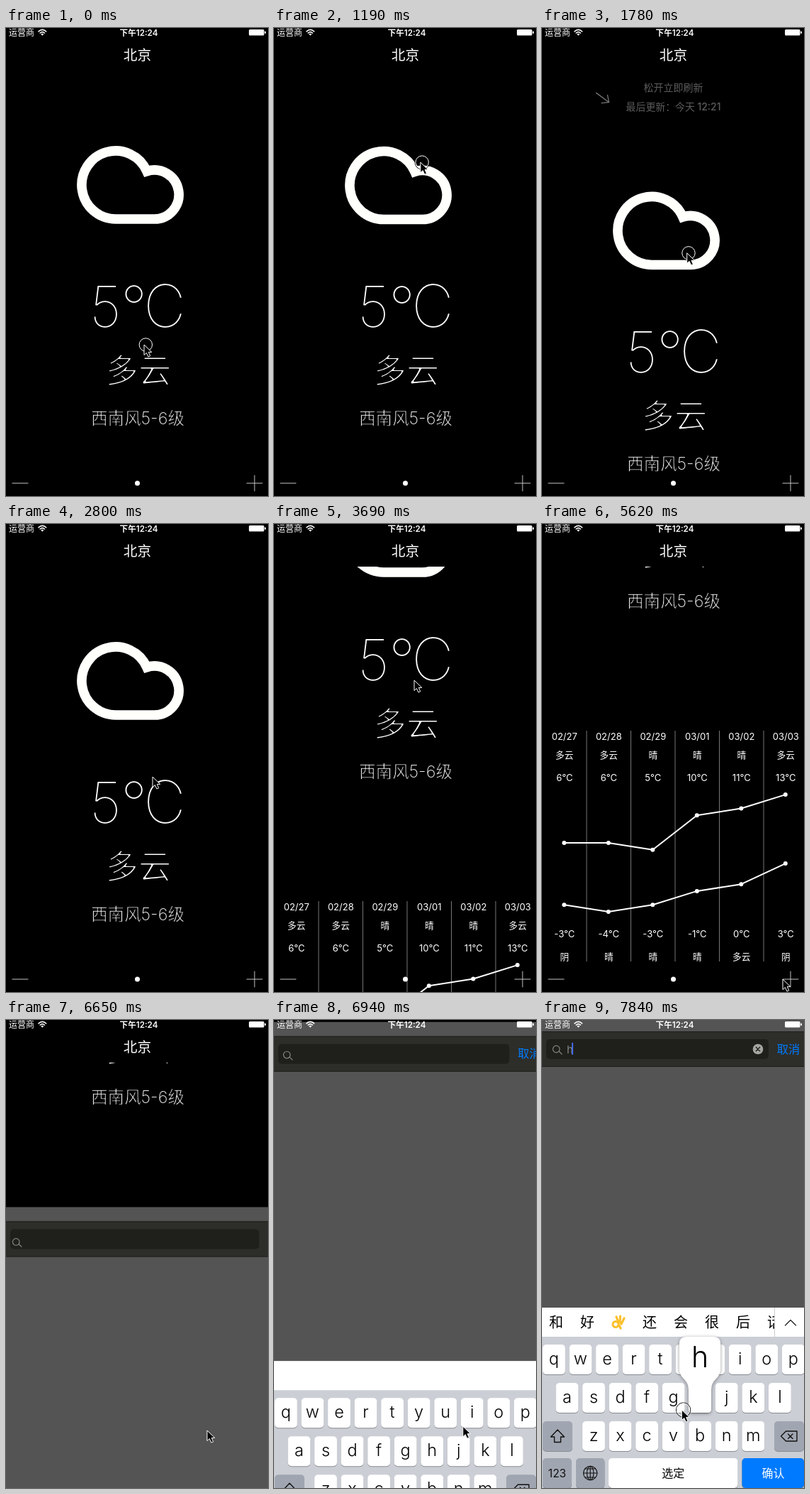
These frames come from a looping animation (370 px wide and 659 px high, 7990 ms). An HTML page:

```html
<!DOCTYPE html>
<html lang="zh-CN">
<head>
<meta charset="utf-8">
<title>天气</title>
<style>
html, body { margin: 0; width: 100%; height: 100%; overflow: hidden; background: #000; }
svg { display: block; width: 100vw; height: 100vh; }
text { font-family: Inter, "Noto Sans CJK SC", "Noto Sans CJK", sans-serif; white-space: pre; }
.line { fill: none; stroke-linecap: round; stroke-linejoin: round; }
/* A background-coloured outline turns regular strokes into hairlines. */
.hairline { stroke: #000; stroke-linejoin: round; }
</style>
</head>
<body>
<svg viewBox="0 0 370 659" preserveAspectRatio="none">
  <defs>
    <clipPath id="page"><rect y="60" width="370" height="599"/></clipPath>
    <clipPath id="words"><rect y="405" width="328" height="41"/></clipPath>
    <filter id="lift" x="-30%" y="-30%" width="160%" height="160%">
      <feDropShadow dx="0" dy="1" stdDeviation="2.5" flood-opacity=".4"/>
    </filter>
  </defs>
  <rect width="370" height="659"/>
  <g clip-path="url(#page)"><g id="scroll"></g></g>
  <g id="chrome"></g>
  <g id="sheet"></g>
  <g id="keyboard"></g>
  <g id="status"></g>
  <g id="pointer">
    <g id="ring" fill="none">
      <circle cx="2.3" r="10.1" stroke="#000"/>
      <circle cx="2.3" r="9.2" stroke="#fff"/>
    </g>
    <path d="M0 0V14.5L3.4 11.5L5.9 17L8.7 15.8L6.3 10.4H10.8Z" fill="#000" stroke="#fff"/>
  </g>
</svg>
<script>
const $ = id => document.getElementById(id);

const text = (x, y, size, str, { weight = 400, fill = '#fff', anchor = 'middle', extra = '' } = {}) =>
  `<text x="${x}" y="${y}" font-size="${size}" font-weight="${weight}" fill="${fill}" text-anchor="${anchor}" ${extra}>${str}</text>`;
const thin = (str, width) => `<tspan class="hairline" stroke-width="${width}">${str}</tspan>`;
const rect = (x, y, w, h, fill, r = 0, extra = '') =>
  `<rect x="${x}" y="${y}" width="${w}" height="${h}" rx="${r}" fill="${fill}" ${extra}/>`;
const line = (d, stroke, width = 1, extra = '') =>
  `<path class="line" d="${d}" stroke="${stroke}" stroke-width="${width}" ${extra}/>`;

// Weather page
function forecast() {
  const days = [
    ['02/27', '多云', 6, -3, '阴'], ['02/28', '多云', 6, -4, '晴'], ['02/29', '晴', 5, -3, '晴'],
    ['03/01', '晴', 10, -1, '晴'], ['03/02', '晴', 11, 0, '多云'], ['03/03', '多云', 13, 3, '阴']
  ];
  const colX = i => 31.3 + i * 62.5;
  const curve = temps => {
    const points = temps.map((t, i) => [colX(i), 948.2 - 9.7 * t]);
    return line('M' + points.join('L'), '#fff', 2)
      + points.map(([x, y]) => `<circle cx="${x}" cy="${y}" r="3" fill="#fff"/>`).join('');
  };
  const columns = days.map(([date, day, high, low, night], i) => {
    const x = colX(i) + .5;
    return text(x, 744.5, 13, date) + text(x, 771, 12.7, day) + text(x, 803, 13, high + '°C')
      + text(x, 1022.5, 13, low + '°C') + text(x, 1054.5, 12.7, night)
      + (i ? rect(i * 62.5, 732, 1, 325, '#777') : '');
  });
  return columns.join('') + curve(days.map(d => d[2])) + curve(days.map(d => d[3]));
}

const hintStyle = { weight: 500, fill: '#5c5c5c' };
$('scroll').innerHTML =
  text(185.5, 25, 14, '', { ...hintStyle, extra: 'id="hint"' })
  + text(185.5, 51.5, 13.9, '最后更新：今天 12:21', hintStyle)
  + `<g transform="translate(85.5 33.5)">${line('M-11 0H11M3.5-7L11.3 0L3.5 7', '#777', 1.3, 'id="arrow"')}</g>`
  + `<path d="M155 269A48 48 0 1 1 198.9 201.7A34.5 34.5 0 1 1 209.5 269Z"
      fill="none" stroke="#fffffc" stroke-width="13.6" stroke-miterlimit="10"/>`
  + text(140.8, 420.5, 79, '5', { weight: 100 })
  + text(180.5, 423, 82, '°', { weight: 100 })
  + text(224, 420.5, 82, 'C', { weight: 100 })
  + text(187, 498.5, 46.5, thin('多云', 2.1))
  + text(186, 557.5, 23.6, thin('西南风', .75) + '5-6' + thin('级', .75), { weight: 200, fill: '#f0f0f0' })
  + forecast();

$('chrome').innerHTML = text(185.5, 45, 19.7, '北京')
  + line('M9 641H31M340 641H362M351 630V652', '#c4c4c4')
  + '<circle cx="185.5" cy="641" r="3.5" fill="#fff"/>';

$('status').innerHTML = text(4, 10.7, 12, '运营商', { anchor: 'start' })
  + line('M46 4.8Q51.3 0 56.6 4.8M48.2 7Q51.3 4.2 54.4 7', '#fff', 1.6)
  + '<path d="M49.2 8.5Q51.3 6.8 53.4 8.5L51.3 10.8Z" fill="#fff"/>'
  + text(187.5, 10.5, 11.6, '下午12:24', { weight: 600 })
  + rect(343, 2, 21.5, 8.5, '#fff', 1.5) + rect(365.3, 4.5, 1.7, 3.5, '#fff', .8);

// Search sheet
$('sheet').innerHTML = rect(0, 0, 370, 670, '#545454')
  + rect(0, 20, 370, 50, '#2d2e29') + rect(0, 20, 370, 1, '#1c1d19') + rect(0, 69, 370, 1, '#1c1d19')
  + rect(6, 31, 314, 28, '#1f201b', 5, 'id="field"')
  + `<g id="lens">${line('M4.3 3.3L8 7M5 0A4.8 4.8 0 1 1-4.6 0A4.8 4.8 0 1 1 5 0', '#85867f', 1.2)}</g>`
  + text(348, 50.5, 16.3, '取消', { fill: '#007aff', extra: 'id="cancel"' })
  + `<g id="query">${text(35, 50.5, 15, 'h', { fill: '#85888a', anchor: 'start' })}
    <circle cx="305" cy="45" r="7.3" fill="#a5a6a2"/>
    ${line('M302.3 42.3L307.7 47.7M307.7 42.3L302.3 47.7', '#1f201b', 1.4)}
    ${rect(42, 36, 2, 17, '#4468e8')}</g>`;

// Keyboard
const grey = '#a0a6b1';
const key = (x, y, w, fill = '#fff') => rect(x, y + 1, w, 42, '#888b91', 5) + rect(x, y, w, 42, fill, 5);
const letterRow = (letters, x0, y) => [...letters].map((c, i) => {
  const x = x0 + i * 37.55;
  return key(x, y, 31.8) + text(x + 15.9, y + 28, 23.5, c, { weight: 300, fill: '#000' });
}).join('');

$('keyboard').innerHTML = rect(0, 405, 370, 260, '#cbced5') + rect(0, 405, 370, 41, '#fff')
  + `<g id="candidates"><g clip-path="url(#words)">
    ${[...'和好 还会很后话'].map((c, i) => text(20 + 44 * i, 433.2, 20, c, { fill: '#000' })).join('')}
    <circle cx="104" cy="428.5" r="4" fill="none" stroke="#fbc02d" stroke-width="3"/>
    ${line('M108 426L105 418M110 426L110.5 417M112 428L116 420M109 430L111 434', '#fbc02d', 3.2)}</g>
    ${rect(328, 405, 1, 41, '#ccc')}${line('M343.5 430L351 422.5L358.5 430', '#222', 1.3)}</g>`
  + letterRow('qwertyuiop', 1, 457) + letterRow('asdfghjkl', 19.6, 511) + letterRow('zxcvbnm', 57.1, 565)
  + key(1, 565, 42, grey) + line('M22 577L31.5 587H26.5V594.5H17.5V587H12.5Z', '#111', 1.4)
  + key(328, 565, 42, grey)
  + line('M337.5 586L344.5 579H360V593H344.5ZM347.5 583L354 589.5M354 583L347.5 589.5', '#111', 1.4)
  + key(1, 617, 41, grey) + text(21.5, 643.5, 15.5, '123', { fill: '#111' })
  + key(48, 617, 40.5, grey)
  + `<g transform="translate(68.2 638)" class="line" stroke="#111" stroke-width="1.1">
    <circle r="9.7"/><ellipse rx="4.7" ry="9.7"/><path d="M-9.7 0H9.7M0-9.7V9.7M-7.5-6H7.5M-7.5 6H7.5"/></g>`
  + key(94, 617, 182.5) + text(185.3, 644.2, 16, '', { fill: '#000', extra: 'id="space"' })
  + `<g id="find">${key(282.5, 617, 87.5, grey)}${text(326.5, 644.2, 16, '搜索', { fill: '#6d7078' })}</g>`
  + `<g id="confirm">${key(282.5, 617, 87.5, '#007aff')}${text(326.5, 644.2, 16, '确认')}</g>`
  + `<g id="popup"><path filter="url(#lift)" fill="#fff" d="M204 446H242Q252 446 252 456V490
      C252 506 239 505 239 520V548Q239 553 234 553H212Q207 553 207 548V520C207 505 194 506 194 490V456Q194 446 204 446Z"/>
    ${text(223, 488.5, 41, 'h', { weight: 300, fill: '#000' })}</g>`;

// Motion.
const LOOP = 7990, STEP = 148, LAST = 53;

const mix = (a, b, p) => a + (b - a) * p;
const linear = (now, from, to) => Math.min(1, Math.max(0, (now - from) / (to - from)));
const smooth = (...span) => { const p = linear(...span); return p * p * (3 - 2 * p); };
const easeOut = (...span) => 1 - (1 - linear(...span)) ** 3;
const move = (id, x, y) => $(id).setAttribute('transform', `translate(${x} ${y})`);
const show = (id, on) => $(id).setAttribute('visibility', on ? 'visible' : 'hidden');

const gestures = [
  { from: -1, to: 0, x: 195, y: 446, down: true },
  { from: 0, to: 7, x: 207, y: 178 },
  { from: 7, to: 13, x: 204.5, y: 328, down: true },   // pull to refresh
  { from: 13, to: 18, x: 207, y: 356 },
  { from: 20, to: 24, x: 198, y: 220, down: true },    // first flick
  { from: 25, to: 27, x: 185, y: 440 },
  { from: 27, to: 31, x: 175, y: 239, down: true },    // second flick
  { from: 32, to: 38, x: 340, y: 641 },
  { from: 38, to: 41, x: 340, y: 641, down: true },    // tap on plus
  { from: 42, to: 45, x: 284, y: 578 },
  { from: 45, to: 52, x: 197.3, y: 549 },
  { from: 52, to: 53, x: 197.3, y: 549, down: true }   // tap on a letter
];

function pointerAt(now) {
  let { x, y } = gestures[0];
  for (const g of gestures) {
    const p = smooth(now, g.from, g.to);
    x = mix(x, g.x, p);
    y = mix(y, g.y, p);
  }
  return { x, y, down: gestures.some(g => g.down && now > g.from && now <= g.to) };
}

function scrollAt(now, pointerY) {
  if (now <= 7) return 0;
  if (now <= 13) return Math.max(0, (pointerY - 188) / 2);
  if (now <= 18) return 70 * (1 - smooth(now, 13, 18));
  return -201 * smooth(now, 20, 25) - 240 * smooth(now, 27, 31);
}

function render(time) {
  const now = Math.min(LAST, Math.floor((time + 16) / STEP));
  const pointer = pointerAt(now);
  const typed = now === LAST;

  move('pointer', pointer.x, pointer.y);
  show('ring', pointer.down);
  move('scroll', 0, scrollAt(now, pointer.y));
  $('hint').textContent = now < 12 ? '下拉可以刷新' : '松开立即刷新';
  $('arrow').setAttribute('transform', `rotate(${mix(90, -90, linear(now, 11.2, 13.9))})`);

  const focus = linear(now, 44, 48);
  move('sheet', 0, mix(659, -4, easeOut(now, 44, 47.83)));
  $('field').setAttribute('width', mix(364, 314, focus));
  move('cancel', mix(50, 0, focus), 0);
  move('lens', mix(12, 20, focus), mix(50.3, 45, focus));
  show('query', typed);

  move('keyboard', 0, mix(254, 0, easeOut(now, 46, 49)));
  for (const id of ['candidates', 'popup', 'confirm']) show(id, typed);
  $('space').textContent = typed ? '选定' : '空格';
}

const start = performance.now();
(function tick() {
  render((performance.now() - start) % LOOP);
  requestAnimationFrame(tick);
})();
</script>
</body>
</html>
```
